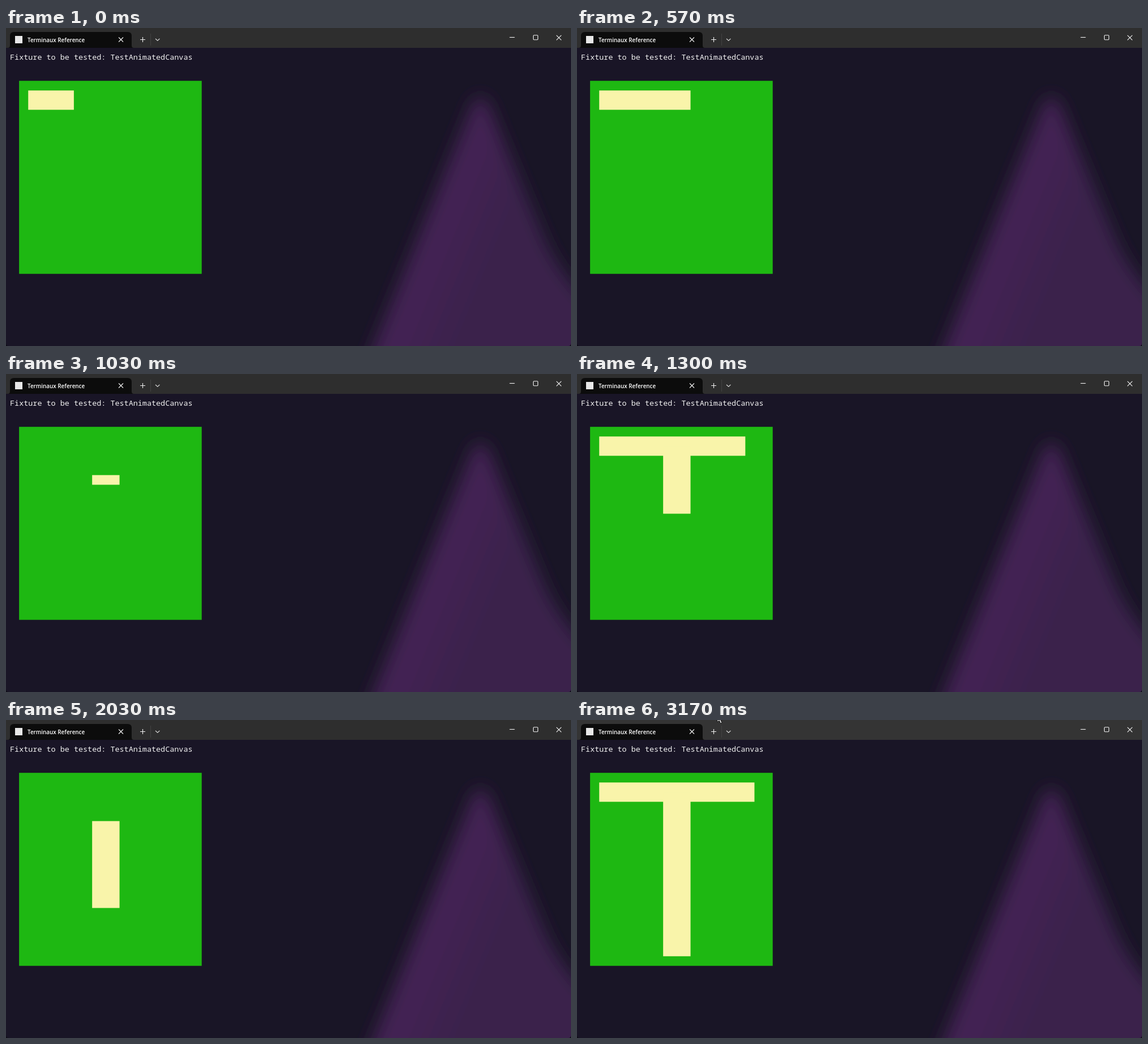
These frames come from a looping animation (998x561 px, 3200 ms). An HTML page:

```html
<!DOCTYPE html>
<html lang="en">
<head>
<meta charset="utf-8">
<title>Terminal canvas</title>
<style>
  html, body { margin: 0; width: 100%; height: 100%; overflow: hidden; background: #0c0a14; }
  svg { display: block; width: 998px; height: 561px; }
  .line { fill: none; stroke: #f2f2f2; stroke-width: 1.1; }
  .tab { font: 600 9.9px "Open Sans", "Noto Sans", sans-serif; fill: #fff; }
  .term { font: 500 13.44px "Noto Sans Mono", "DejaVu Sans Mono", monospace; fill: #f2f2f2; }
</style>
</head>
<body>
<svg viewBox="0 0 998 561">
  <defs>
    <clipPath id="window"><path d="M0 0H998V556Q998 561 993 561H5Q0 561 0 556Z"/></clipPath>
    <filter id="soft" filterUnits="userSpaceOnUse" x="540" y="30" width="560" height="680">
      <feGaussianBlur stdDeviation="15"/>
    </filter>
    <linearGradient id="glow" gradientUnits="userSpaceOnUse" x1="720" y1="380" x2="850" y2="433">
      <stop offset="0" stop-color="#432253"/>
      <stop offset=".4" stop-color="#422152"/>
      <stop offset="1" stop-color="#3a204c"/>
    </linearGradient>
  </defs>

  <g clip-path="url(#window)">
    <rect width="998" height="561" fill="#191526"/>
    <path filter="url(#soft)" fill="url(#glow)"
      d="M824 134Q838 108 852 134L885 215Q925 310 950 370Q975 430 1040 495V630H621Z"/>

    <rect id="titlebar" width="998" height="35" fill="#2e2e2e"/>
    <path fill="#0c0c0c" d="M3 35Q7 35 7 31V14Q7 7 14 7H215Q222 7 222 14V31Q222 35 226 35Z"/>
    <rect x="16" y="14" width="13" height="13" fill="#e8e8e8"/>
    <text class="tab" x="38" y="25">Terminaux Reference</text>
    <path class="line" d="M199 16.5l8 8m0-8l-8 8"/>
    <path class="line" d="M237 20.5h9m-4.5-4.5v9"/>
    <path d="M255.5 10V31" stroke="#434343"/>
    <path class="line" d="M264 18.8l3.7 3.5l3.7-3.5"/>
    <path class="line" d="M889.5 16.5h9"/>
    <rect class="line" x="931.5" y="12.8" width="8" height="8" rx="1.2"/>
    <path class="line" d="M972.3 12.8l8.6 8.6m0-8.6l-8.6 8.6"/>

    <text class="term" x="7" y="55.5">Fixture to be tested: TestAnimatedCanvas</text>

    <rect x="23.1" y="93.2" width="322.6" height="340.5" fill="#1eb812"/>
    <g fill="#f9f4aa">
      <rect id="bar"/>
      <rect id="stem"/>
    </g>
    <path id="cursor" visibility="hidden" fill="#fff" stroke="#000" stroke-width=".8"
      d="M248-11v14.5l3.2-3l2.4 5.3l2.2-1l-2.4-5.1h4.6Z"/>
  </g>
</svg>
<script>
  const LOOP = 3200, FIRST = 5;
  const CELL_W = 16.13, CELL_H = 17.03, LEFT = 23.1, TOP = 93.2;

  // When each growth step, counted from FIRST, is fully painted
  const painted = [0, 100, 200, 330, 430, 570, 700, 830, 930, 1100, 1200,
    1300, 1430, 1570, 1700, 1830, 1930, 2070, 2200, 2300, 2430, 2570];
  // When a repaint has wiped the top rows of the previous step
  const wipes = [170, 300, 400, 670, 800, 1030, 1170, 1270, 1400, 1530, 2030, 2530];
  const brighten = [3070, 3100, 3130, 3170];

  const el = id => document.getElementById(id);
  const passed = (times, t) => times.filter(x => x <= t).length;

  function fillCells(node, col, row, cols, rows) {
    const box = {
      x: LEFT + col * CELL_W, y: TOP + row * CELL_H,
      width: Math.max(0, cols) * CELL_W, height: Math.max(0, rows) * CELL_H
    };
    for (const key in box) node.setAttribute(key, box[key]);
  }

  function draw(t) {
    const index = passed(painted, t) - 1;
    const step = FIRST + index;
    const wiped = wipes.some(w => w <= t && w > painted[index]);
    const stemTop = wiped ? 5 : 2;
    const stemEnd = step > 10 ? step - 7 : 0;
    fillCells(el("bar"), 1, 1, wiped ? 0 : Math.min(step, 17), 2);
    fillCells(el("stem"), 8, stemTop, 3, stemEnd - stemTop);

    const shade = Math.round(46 + 1.5 * passed(brighten, t));
    el("titlebar").setAttribute("fill", `rgb(${shade},${shade},${shade})`);
    el("cursor").setAttribute("visibility", t >= 3170 ? "visible" : "hidden");
  }

  const start = performance.now();
  function tick() {
    draw((performance.now() - start) % LOOP);
    requestAnimationFrame(tick);
  }
  tick();
</script>
</body>
</html>
```
